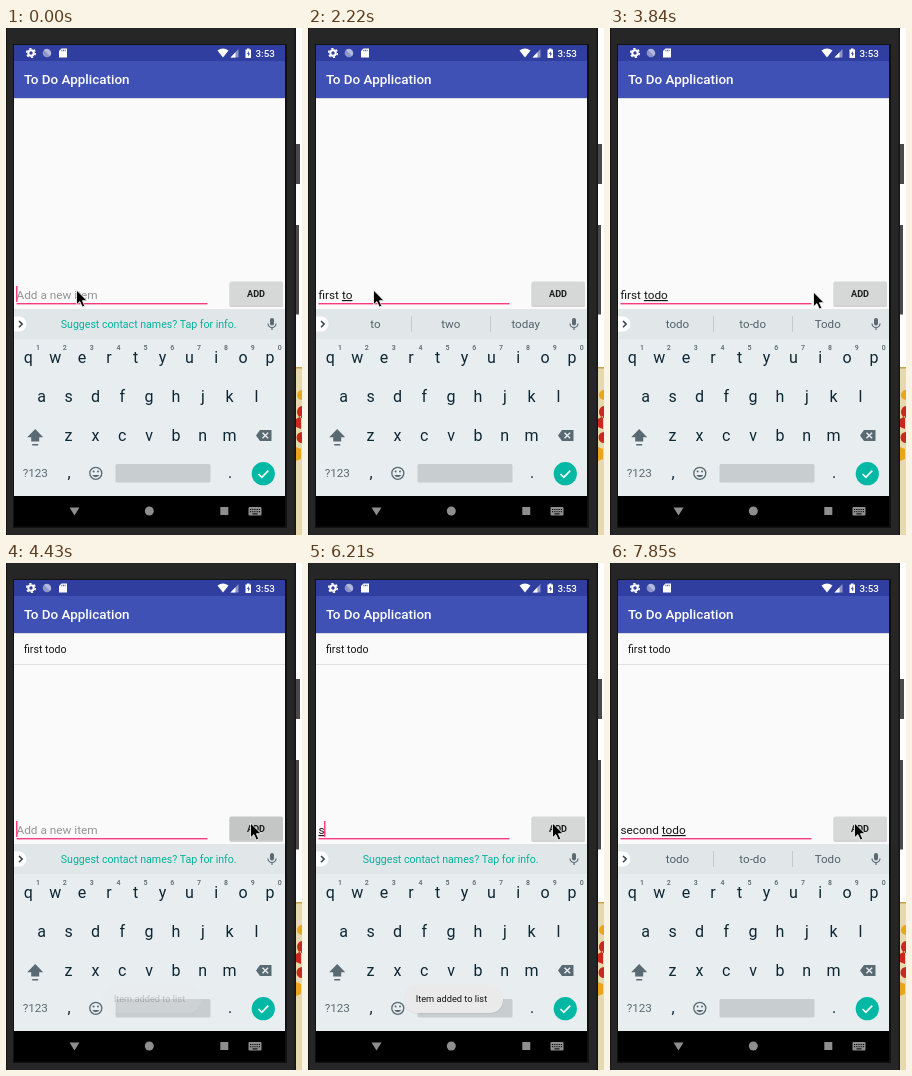
An HTML page that plays this animation: 296x507 px, repeating every 8 s.

```html
<!DOCTYPE html>
<html lang="en">
<head>
<meta charset="utf-8">
<title>To Do Application</title>
<style>
html, body { margin: 0; width: 100%; height: 100%; overflow: hidden; background: #fff; }
svg { display: block; width: 296px; height: 507px; font-family: Roboto, sans-serif; }
text { white-space: pre; }
.mid { text-anchor: middle; }
.med { font-weight: 500; }
.key { font-size: 16px; fill: #0d2733; }
.num { font-size: 7px; font-weight: 500; fill: #54646c; }
.sug { font-size: 11.6px; fill: #52626a; }
.field { font-size: 11.8px; fill: #161616; }
.icon { fill: #5a6a72; }
.nav { fill: #8e8e8e; }
</style>
</head>
<body>
<svg viewBox="0 0 296 507">
  <!-- surroundings and phone body -->
  <rect width="296" height="507" fill="#fff"/>
  <rect x="290" y="339" width="6" height="168" fill="#e6d9b0"/>
  <path d="M290 339h6v1.500h-6z" fill="#c9a24a"/>
  <path d="M296 378a5 6 0 0 0 0 12zM290 391l5-3v13l-5-2zM296 404a5 5 0 0 0 0 11z" fill="#c8281e"/>
  <path d="M296 362a5 5 0 0 0 0 10zM290 419l5 2v10l-5 2z" fill="#e9a51c"/>
  <path d="M290 116h4v40h-4zM290 197h3v89.500h-3z" fill="#4a4a4c"/>
  <rect width="290" height="507" fill="#262627"/>
  <path d="M0 0h1v507H0zM288.500 0H290v507h-1.500z" fill="#161617"/>
  <rect x="7" y="16" width="274" height="484" fill="#111"/>

  <!-- app -->
  <rect x="8" y="17" width="271" height="451" fill="#fafafa"/>
  <rect x="8" y="17" width="271" height="16" fill="#303f9f"/>
  <rect x="8" y="33" width="271" height="37" fill="#3f51b5"/>
  <path d="M8 70.500h271" stroke="#dcdce0"/>
  <g fill="#fff">
    <circle cx="25" cy="25" r="2.700" fill="none" stroke="#fff" stroke-width="2"/>
    <circle cx="25" cy="25" r="4.300" fill="none" stroke="#fff" stroke-width="1.600" stroke-dasharray="2.250"/>
    <circle cx="41" cy="25" r="4.300" fill="#8d96cb"/>
    <path d="M38 22a4.300 4.300 0 0 1 6 6z" fill="#b4bade"/>
    <path d="M53 23l2.500-2.500H61v9h-8z"/>
    <path d="M55.500 22.500h4" stroke="#303f9f" stroke-width="1.500" stroke-dasharray=".8"/>
    <path d="M211.500 22.500q5.500-4 11 0L217 29.500z"/>
    <path d="M224.500 29.500l8-8.500v8.500z" opacity=".45"/>
    <path d="M224.500 29.500l5-5.300v5.300z"/>
    <path d="M239.500 21.500h1.500v-1h2.500v1h1.500v8.500h-5.500z"/>
    <path d="M242.800 23l-1.800 3h1.200v2.500l1.800-3h-1.200z" fill="#303f9f"/>
    <text x="249.500" y="28.700" class="med" font-size="9.800">3:53</text>
    <text x="18" y="56.300" class="med" font-size="13.450">To Do Application</text>
  </g>
  <g id="item">
    <text x="18" y="89.500" font-size="10.600" fill="#161616">first todo</text>
    <path d="M8 101.500h271" stroke="#e0e0e0"/>
  </g>
  <text id="hint" class="field" x="10.500" y="271" style="fill:#949494">Add a new item</text>
  <text id="field" class="field" x="10.500" y="271"><tspan id="done"></tspan><tspan id="word" text-decoration="underline"></tspan></text>
  <rect x="10.500" y="275" width="191" height="1.400" fill="#fb3a80"/>
  <rect id="caret" y="258" width="1.500" height="16" fill="#ff4081"/>
  <rect x="223.500" y="254.500" width="53.500" height="24.500" rx="1.500" fill="#000" opacity=".16"/>
  <rect id="button" x="223.500" y="253.500" width="53.500" height="24" rx="1.500" fill="#d6d7d7"/>
  <text x="250" y="269" class="mid" font-size="9.150" font-weight="700" fill="#1c1c1c">ADD</text>

  <!-- keyboard -->
  <rect x="8" y="281" width="271" height="187" fill="#e8edf0"/>
  <rect x="8" y="281" width="271" height="30" fill="#e1e6e9"/>
  <path d="M8 288.500h5a7.500 7.500 0 0 1 0 15H8z" fill="#fff"/>
  <path d="M13 293l3.200 3.100-3.200 3.100" fill="none" stroke="#37474f" stroke-width="1.500"/>
  <text id="tip" class="mid" x="142.700" y="300" font-size="10.600" fill="#00b39b">Suggest contact names? Tap for info.</text>
  <g id="sugs">
    <path d="M103.500 288v16M182.500 288v16" stroke="#c3cacd"/>
    <text class="sug mid" x="67.500" y="300.300"></text>
    <text class="sug mid" x="142.700" y="300.300"></text>
    <text class="sug mid" x="217.700" y="300.300"></text>
  </g>
  <rect x="264" y="290" width="4" height="7.500" rx="2" class="icon"/>
  <path d="M262 295.500a4 4 0 0 0 8 0M266 299.500v2.500" fill="none" stroke="#5a6a72" stroke-width="1.200"/>
  <g id="keys"></g>
  <g class="icon">
    <path d="M29.200 401l8 8.300h-4v4.200h-8v-4.200h-4zM26.200 416h6v1.500h-6z"/>
    <path d="M250 407.500l4-5.500h11.500v11H254z"/>
    <path d="M256.500 404.700l5.600 5.600m0-5.600l-5.600 5.600" stroke="#e8edf0" stroke-width="1.400"/>
    <text x="29.300" y="449.300" class="mid" font-size="11.700">?123</text>
    <circle cx="89.800" cy="445.300" r="6" fill="none" stroke="#5a6a72" stroke-width="1.300"/>
    <circle cx="87.600" cy="443.600" r="1"/><circle cx="92" cy="443.600" r="1"/>
    <path d="M86.300 447h7a3.700 3.200 0 0 1-7 0z"/>
  </g>
  <rect x="109.500" y="436" width="95" height="18.500" rx="1.500" fill="#c8cdd0"/>
  <circle cx="257.300" cy="445.700" r="11.600" fill="#00b8a4"/>
  <path d="M252.500 446l3.300 3.300 6.500-6.700" fill="none" stroke="#fff" stroke-width="1.600"/>

  <!-- navigation bar -->
  <rect x="8" y="468" width="271" height="30.500" fill="#000"/>
  <g class="nav">
    <path d="M63.500 479.500h10L68.500 487.500z"/>
    <circle cx="143.300" cy="483" r="4.500"/>
    <rect x="214.300" y="479" width="8" height="8"/>
    <rect x="242.500" y="479" width="13" height="8.500" rx="1"/>
    <path d="M244 481.500h10M244 483.700h10" stroke="#000" stroke-dasharray="1.200 1"/>
    <path d="M246.500 485.900h5" stroke="#000"/>
  </g>

  <g id="toast">
    <rect x="96.500" y="423" width="99" height="28" rx="13" fill="#000" opacity=".06"/>
    <rect x="96.500" y="421.500" width="98.500" height="28.500" rx="13" fill="#eaeaea"/>
    <text x="143.400" y="439.300" class="mid" font-size="9.250" fill="#161616">Item added to list</text>
  </g>
  <path id="mouse" d="M0 0V14.800l3.400-3.200 2.400 5.400 2.500-1.100-2.400-5.200h4.700z" fill="#000" stroke="#fff" stroke-width=".8"/>
</svg>
<script>
const LOOP = 8000;
const $ = id => document.getElementById(id);
const show = (el, on) => el.style.display = on ? '' : 'none';

// Keyboard letters
const PITCH = 26.85;
const label = (cls, x, y, s) => `<text class="${cls} mid" x="${x}" y="${y}">${s}</text>`;
const row = (s, x, y) => [...s].map((c, i) => label('key', x + i * PITCH, y, c)).join('');
$('keys').innerHTML =
  row('qwertyuiop', 22.3, 335) + row('asdfghjkl', 35.7, 373.5) + row('zxcvbnm', 62.5, 412.5) +
  [...'1234567890'].map((c, i) => label('num', 32 + i * PITCH, 322, c)).join('') +
  label('key', 63, 450, ',') + label('key', 224, 450, '.');

// [time, committed text, composing word, caret on, suggestions]
const typing = [
  [0, '', '', 1],
  [440, '', 'f', 1, 'f|for|from'],
  [590, '', 'fi', 1, 'fi|first|find'],
  [740, '', 'fir', 1, 'fir|first|fire'],
  [890, '', 'firs', 1, 'firs|first|first-hand'],
  [1030, '', 'first', 1, 'first|firstly|first-hand'],
  [1330, 'first ', '', 1, 'time|of|day'],
  [1620, 'first ', 't', 1, 't|time|to'],
  [1770, 'first ', 'to', 1, 'to|two|today'],
  [2220, 'first ', 'to', 0, 'to|two|today'],
  [2660, 'first ', 'to', 1, 'to|two|today'],
  [3110, 'first ', 'tod', 1, 'tod|today|TOD'],
  [3250, 'first ', 'todo', 1, 'todo|to-do|Todo'],
  [3840, 'first ', 'todo', 0, 'todo|to-do|Todo'],
  [4280, 'first ', 'todo', 1, 'todo|to-do|Todo'],
  [4430, '', '', 1],
  [5010, '', '', 0],
  [5460, '', '', 1],
  [6060, '', '', 0],
  [6210, '', 's', 1],
  [6510, '', 'seco', 1, 'seco|second|seconds'],
  [6660, '', 'second', 1, 'second|seconds|secondly'],
  [6800, 'second ', '', 1, 'time|one|half'],
  [6950, 'second ', 't', 1, 't|time|to'],
  [7100, 'second ', 'to', 1, 'to|two|today'],
  [7250, 'second ', 'tod', 1, 'tod|today|TOD'],
  [7400, 'second ', 'todo', 1, 'todo|to-do|Todo'],
  [7850, 'second ', 'todo', 0, 'todo|to-do|Todo']
];
const mouse = [[0, 70.5, 262], [150, 65.5, 262], [3550, 83, 262], [3700, 148, 263],
  [3840, 203.5, 264], [3980, 236, 262], [4130, 244.5, 260]];
const toast = [[0, 0], [4430, .2], [4580, .6], [4720, .85], [4870, .95], [5010, 1],
  [6510, .6], [6660, .2], [6800, 0]];

const at = (list, t) => list.findLast(step => step[0] <= t);
const slots = $('sugs').querySelectorAll('text');
let last;

function drawTyping(step) {
  const [, done, word, caret, sugs] = step;
  $('done').textContent = done;
  $('word').textContent = word;
  show($('hint'), !done && !word);
  show($('caret'), caret);
  const width = done || word ? $('field').getComputedTextLength() : 0;
  $('caret').setAttribute('x', Math.round(10.3 + width));
  show($('tip'), !sugs);
  show($('sugs'), sugs);
  if (sugs) sugs.split('|').forEach((s, i) => slots[i].textContent = s);
}

function draw(now) {
  const t = now % LOOP;
  const step = at(typing, t);
  if (step !== last) drawTyping(last = step);
  const [, x, y] = at(mouse, t);
  $('mouse').setAttribute('transform', `translate(${x} ${y})`);
  $('toast').style.opacity = at(toast, t)[1];
  show($('item'), t >= 4430);
  $('button').setAttribute('fill', t >= 4280 && t < 4580 ? '#c4c5c5' : '#d6d7d7');
}

const start = performance.now();
const frame = () => {
  draw(performance.now() - start);
  requestAnimationFrame(frame);
};
frame();
</script>
</body>
</html>
```
